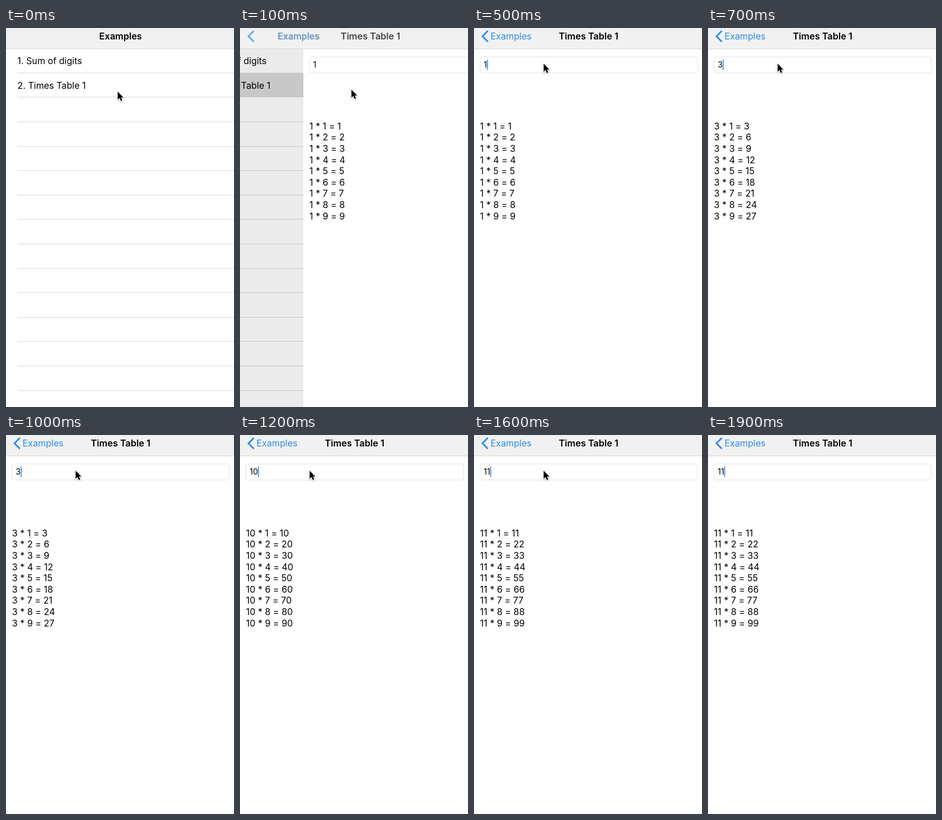
Write an HTML page with a canvas that moves like this. It is 400 px wide and 661 px high and loops after 2 s.

```html
<!DOCTYPE html>
<html lang="en">
<head>
<meta charset="utf-8">
<title>Times table</title>
<style>
  html, body { margin: 0; width: 100%; height: 100%; overflow: hidden; background: #fff; }
  canvas { display: block; width: 400px; height: 661px; }
</style>
</head>
<body>
<canvas id="stage"></canvas>
<script>
const W = 400, H = 661, LOOP = 2000, STEP = 100;
const BLUE = '#2f8ce6', BAR_HEIGHT = 36;
const canvas = document.getElementById('stage');
const ctx = canvas.getContext('2d');
const ratio = window.devicePixelRatio || 1;
canvas.width = W * ratio;
canvas.height = H * ratio;

// [time, value] and [time, x, y]
const entries = [[0, '1'], [700, '3'], [1100, '1'], [1200, '10'], [1500, '1'], [1600, '11']];
const pointerPath = [[0, 196, 111], [200, 195, 104], [400, 122.2, 62.3]];

function text(str, x, y, size = 15.8, color = '#000', weight = 400, align = 'left') {
  ctx.font = `${weight} ${size}px Inter, sans-serif`;
  ctx.textAlign = align;
  ctx.fillStyle = color;
  ctx.fillText(str, x, y);
}

function rect(x, y, w, h, color) {
  ctx.fillStyle = color;
  ctx.fillRect(x, y, w, h);
}

function withOffset(x, alpha, draw) {
  ctx.save();
  ctx.translate(x, 0);
  ctx.globalAlpha = alpha;
  draw();
  ctx.restore();
}

function pointerAt(t) {
  const last = pointerPath[pointerPath.length - 1];
  const i = pointerPath.findIndex(point => point[0] > t);
  if (i < 0) return last.slice(1);
  const [t0, x0, y0] = pointerPath[i - 1], [t1, x1, y1] = pointerPath[i];
  const p = (t - t0) / (t1 - t0);
  return [x0 + (x1 - x0) * p, y0 + (y1 - y0) * p];
}

function drawList(selected) {
  rect(0, 0, W, H, '#fff');
  if (selected) rect(0, 79, W, 42, '#d9d9d9');
  for (let i = 0; i < 14; i++) rect(20, Math.round(77.8 + i * 42.6), W - 20, 1, '#d9d9d9');
  text('1. Sum of digits', 20, 63);
  text('2. Times Table 1', 20, 105.5);
}

function drawTable(value, caret) {
  rect(0, 0, W, H, '#fff');
  ctx.beginPath();
  ctx.roundRect(10.5, 50.5, 381.5, 28, 5);
  ctx.lineWidth = 1;
  ctx.strokeStyle = '#e2e2e2';
  ctx.stroke();
  text(value, 17.1, 69, 14);
  if (caret) rect(17 + ctx.measureText(value).width, 55, 1.8, 18, '#4a8fe0');
  for (let n = 1; n <= 9; n++) {
    text(`${value} * ${n} = ${value * n}`, 10.6, 157 + n * 19.63);
  }
}

function drawBar(slide) {
  const titleX = W / 2 + 1, backX = 65;
  const travel = titleX - backX;
  rect(0, 0, W, BAR_HEIGHT, '#f1f1f1');
  rect(0, BAR_HEIGHT, W, 1, '#d6d6d6');
  // The outgoing title turns into the back label on the way
  withOffset(travel * (slide - 1), slide, () => text('Examples', titleX, 20, 16, '#000', 600, 'center'));
  withOffset(travel * slide, 1 - slide, () => text('Examples', backX, 20, 15.8, BLUE, 400, 'center'));
  withOffset(100 * slide, 1 - slide, () => text('Times Table 1', titleX, 20, 16, '#000', 600, 'center'));
  withOffset(0, 1 - slide, () => {
    ctx.beginPath();
    ctx.moveTo(24.3, 5);
    ctx.lineTo(14.8, 14.5);
    ctx.lineTo(24.3, 24);
    ctx.lineWidth = 2.8;
    ctx.strokeStyle = BLUE;
    ctx.stroke();
  });
}

function drawPointer([x, y]) {
  ctx.save();
  ctx.translate(x, y);
  const arrow = new Path2D('M0 0V14L3.3 11L5.6 16.2L8 15.2L5.7 10.2H10Z');
  ctx.shadowColor = 'rgba(0,0,0,.35)';
  ctx.shadowBlur = 3 * ratio;
  ctx.shadowOffsetY = ratio;
  ctx.lineWidth = 1.6;
  ctx.strokeStyle = '#fff';
  ctx.stroke(arrow);
  ctx.shadowColor = 'transparent';
  ctx.fillStyle = '#000';
  ctx.fill(arrow);
  ctx.restore();
}

function render(now) {
  const t = Math.floor(now % LOOP / STEP) * STEP;
  const slide = Math.exp(-1.28 * (t / 100) ** 2); // 1: list, 0: table
  const value = entries.filter(entry => entry[0] <= t).pop()[1];
  const caret = t >= 500 && t !== 1800;

  ctx.setTransform(ratio, 0, 0, ratio, 0, 0);
  withOffset(-120 * (1 - slide), 1, () => drawList(t > 0));
  rect(0, 0, W, H, `rgba(0,0,0,${0.11 * (1 - slide)})`);
  withOffset(W * slide, 1, () => drawTable(value, caret));
  drawBar(slide);
  if (t < 1700) drawPointer(pointerAt(t));
}

const start = performance.now();
(function tick() {
  render(performance.now() - start);
  requestAnimationFrame(tick);
})();
</script>
</body>
</html>
```
